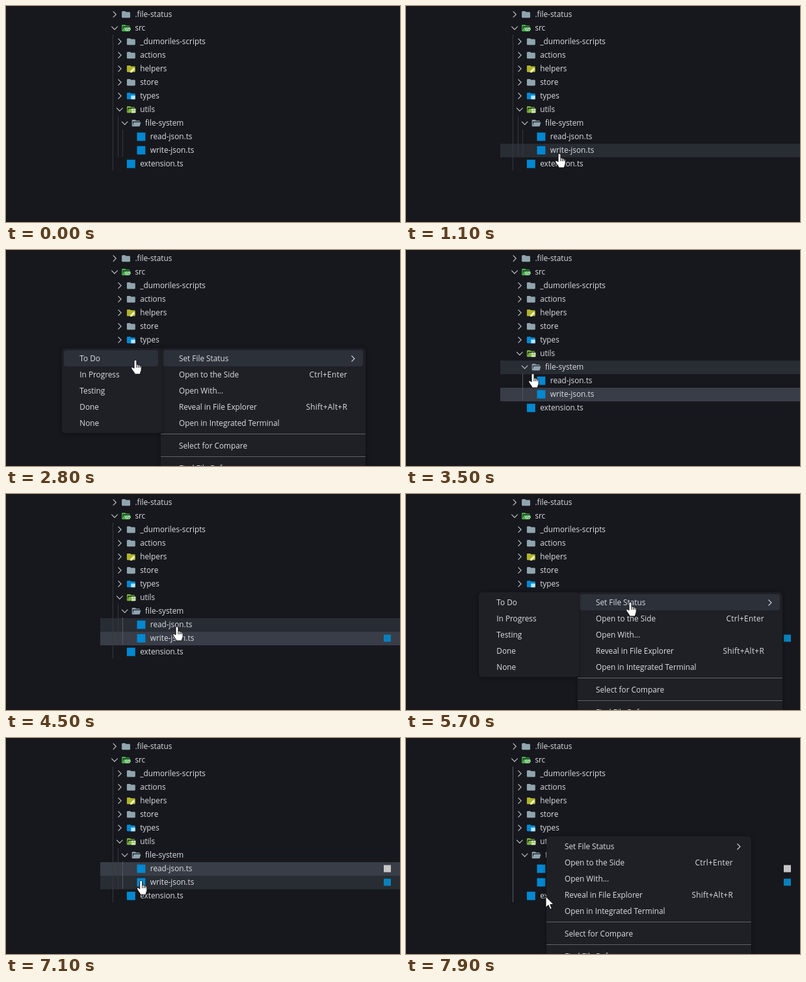
Write an HTML page that moves like this. It is 606x334 px and loops after 8 s.

```html
<!DOCTYPE html>
<html lang="en">
<head>
<meta charset="utf-8">
<title>File status menu</title>
<style>
html, body { margin: 0; width: 100%; height: 100%; overflow: hidden; background: #17181e; }
svg { display: block; width: 606px; height: 334px; }
text { font: 11.8px "Open Sans", "Noto Sans", sans-serif; fill: #dcdfe4; white-space: pre; }
.keys { text-anchor: end; letter-spacing: .3px; }
.panel { filter: drop-shadow(0 1px 3px rgba(0, 0, 0, .4)); }
</style>
</head>
<body>
<svg id="stage" viewBox="0 0 606 334"></svg>
<script>
const LOOP = 8000, STEP = 100;
const HOVER = '#282c33', SELECTED = '#383d47', ITEM = '#2c3039', PANEL = '#1f2026';
const stage = document.getElementById('stage');

function add(parent, tag, attrs = {}, text) {
  const el = document.createElementNS('http://www.w3.org/2000/svg', tag);
  for (const key in attrs) el.setAttribute(key, attrs[key]);
  if (text) el.textContent = text;
  parent.append(el);
  return el;
}
const rect = (parent, x, y, width, height, fill, rx = 0) =>
  add(parent, 'rect', { x, y, width, height, fill, rx });
const show = (el, on) => el.setAttribute('visibility', on ? 'visible' : 'hidden');
const move = (el, x, y) => el.setAttribute('transform', `translate(${x} ${y})`);

// File tree
const CLOSED = 'M10 4H4a2 2 0 0 0-2 2v12a2 2 0 0 0 2 2h16a2 2 0 0 0 2-2V8a2 2 0 0 0-2-2h-8z';
const OPEN = 'M19 20H4a2 2 0 0 1-2-2V6a2 2 0 0 1 2-2h6l2 2h7a2 2 0 0 1 2 2H4v10l2.14-8h17.07l-2.28 8.5A2 2 0 0 1 19 20z';
const GREY = '#90a4ae', BLUE = '#0288d1';

const rows = [
  { name: '.file-status', depth: 0, color: GREY },
  { name: 'src', depth: 0, color: '#4caf50', open: true, badge: 'code' },
  { name: '_dumoriles-scripts', depth: 1, color: GREY },
  { name: 'actions', depth: 1, color: GREY },
  { name: 'helpers', depth: 1, color: '#afb42b', badge: 'pen' },
  { name: 'store', depth: 1, color: GREY },
  { name: 'types', depth: 1, color: BLUE, badge: 'block' },
  { name: 'utils', depth: 1, color: '#7cb342', open: true, badge: 'tools' },
  { name: 'file-system', depth: 2, color: GREY, open: true },
  { name: 'read-json.ts', depth: 3, file: true },
  { name: 'write-json.ts', depth: 3, file: true },
  { name: 'extension.ts', depth: 1, file: true }
];

const badges = {
  code: icon => add(icon, 'path', { d: 'M14 11l-3.5 4 3.5 4M19 11l3.5 4-3.5 4M17.5 11l-2 8', fill: 'none', stroke: '#c8e6c9', 'stroke-width': 1.8 }),
  pen: icon => add(icon, 'path', { d: 'M10 21v-3.5l8-8 3.5 3.5-8 8z', fill: '#f0f4c3' }),
  block: icon => rect(icon, 12, 11, 10, 9, '#b3e5fc'),
  tools: icon => {
    rect(icon, 13, 10, 10, 10, '#dcedc8', 1);
    add(icon, 'path', { d: 'M13 15h10M18 10v5', stroke: '#7cb342', 'stroke-width': 1.5 });
  }
};

const selectBar = rect(stage, 145, 0, 461, 21, SELECTED);
const hoverBar = rect(stage, 145, 0, 461, 21, HOVER);

rows.forEach((row, i) => {
  const y = 13 + 21 * i, x = 198 + 7.8 * row.depth;
  add(stage, 'text', { x: x + .4, y: y + 4.2 }, row.name);
  const icon = add(stage, 'g', { transform: `translate(${x - 21.2} ${y - 7.6}) scale(.645)` });
  if (row.file) {
    rect(icon, 2, 2, 20, 20, BLUE);
    return;
  }
  add(icon, 'path', { d: row.open ? OPEN : CLOSED, fill: row.color });
  if (row.badge) badges[row.badge](icon);
  add(stage, 'path', {
    d: row.open ? 'M-4.7-2.3L0 2.4 4.7-2.3' : 'M-2.3-4.7L2.4 0-2.3 4.7',
    transform: `translate(${x - 31} ${y})`, fill: 'none', stroke: '#c5c7cb', 'stroke-width': 1.1
  });
});

const guides = [[164, 44, 210], [172, 170, 63], [179, 191, 42]]
  .map(([x, y, h]) => rect(stage, x, y, 1, h, '#36383e'));
const blueMark = rect(stage, 581, 217.5, 11, 11, '#0a80bb');
const whiteMark = rect(stage, 581, 196.5, 11, 11, '#c6c6c6');

// Context menu, drawn from its own left edge
const SUB = -152;
const menu = add(stage, 'g');
const itemY = i => 168 + 25 * i;
const highlight = (parent, x, width) => rect(parent, x, 155, width, 25, ITEM, 4);
const label = (parent, x, y, text) => add(parent, 'text', { x, y: y + 4.2 }, text);

rect(menu, 0, 152, 315, 200, PANEL, 5).setAttribute('class', 'panel');
const menuBar = highlight(menu, 3, 308);
['Set File Status', 'Open to the Side', 'Open With...', 'Reveal in File Explorer', 'Open in Integrated Terminal']
  .forEach((text, i) => label(menu, 28, itemY(i), text));
[['Ctrl+Enter', 1], ['Shift+Alt+R', 3]].forEach(([text, i]) =>
  label(menu, 287, itemY(i), text).setAttribute('class', 'keys'));
add(menu, 'path', { d: 'M293.5 163.5l4.5 4.5-4.5 4.5', fill: 'none', stroke: '#d3d6dc', 'stroke-width': 1.1 });
label(menu, 28, 303, 'Select for Compare');
label(menu, 28, 338, 'Find File References');
[284, 319].forEach(y => rect(menu, 0, y, 315, 1, '#606165'));

const submenu = add(menu, 'g');
rect(submenu, SUB, 152, 154, 131, PANEL, 5).setAttribute('class', 'panel');
const subBar = highlight(submenu, SUB + 3, 145);
['To Do', 'In Progress', 'Testing', 'Done', 'None']
  .forEach((text, i) => label(submenu, SUB + 27.3, itemY(i), text));

// Pointer
const outline = { fill: '#fff', stroke: '#0b0b0e', 'stroke-width': 1, 'stroke-linejoin': 'round' };
const hand = add(stage, 'path', { ...outline,
  d: 'M-3 2C-3-.5 1-.5 1 2V7.5C1.6 6.5 3.5 6.8 3.7 8.2 4.3 7.4 5.9 7.8 6.1 9.2 6.9 8.6 8.2 9.2 8.2 10.6V15C8.2 17.5 6.5 18.5 6.5 22H-2C-2 19.5-7 15-7.3 12.5-7.4 11-5.2 10.3-3 13ZM1 7.5V12M3.7 8.2V12M6.1 9.2V12' });
const arrow = add(stage, 'path', { ...outline,
  d: 'M0 0V17L4 13.4 6.7 19.8 9.3 18.6 6.7 12.5H12.1Z' });

// Timeline
const path = [
  [800, 262, 309], [1100, 237, 228], [1800, 237, 227], [2300, 300, 169], [2700, 300, 169],
  [2800, 200, 170], [2900, 200, 170], [3200, 196, 191], [3700, 196, 191], [4500, 264, 205],
  [5000, 264, 205], [5600, 346, 167], [5800, 346, 167], [6400, 195, 167], [6600, 195, 167],
  [7400, 215, 245], [8000, 215, 245]
];
const menus = [
  { from: 1500, to: 3300, left: 238, sub: 2500 },
  { from: 5000, to: 6600, left: 264, sub: 5500 },
  { from: 7800, to: 8000, left: 216, sub: Infinity }
];
const arrowTimes = [[1300, 1900], [4800, 5200], [7700, 8000]];
const guideFade = [[0, 1], [1500, 1], [1700, 0], [3500, 0], [3800, 1], [4900, 1], [5200, 0], [6600, 0], [6900, 1], [7700, 1], [7900, 0], [8000, 0]];

const within = (t, from, to) => t >= from && t < to;
const smooth = k => k * k * (3 - 2 * k);

function sample(keys, t, col, ease = k => k) {
  let i = 0;
  while (i < keys.length - 2 && t >= keys[i + 1][0]) i++;
  const a = keys[i], b = keys[i + 1];
  const k = Math.min(1, Math.max(0, (t - a[0]) / (b[0] - a[0])));
  return a[col] + (b[col] - a[col]) * ease(k);
}

function placeRow(bar, row, on) {
  show(bar, on && row >= 0 && row < rows.length);
  bar.setAttribute('y', 3 + 21 * row);
}

function placeItem(bar, y, on) {
  const i = Math.floor((y - 155.5) / 25);
  const visible = on && i >= 0 && i < 5;
  show(bar, visible);
  if (visible) bar.setAttribute('y', itemY(i) - 13);
}

function drawTree(t, y, hasMenu) {
  const hovered = Math.round((y - 13) / 21);
  const selected = t < 3300 ? -1 : t < 6600 ? 10 : 9;
  placeRow(selectBar, selected, !hasMenu);
  placeRow(hoverBar, hovered, t >= 800 && !hasMenu && hovered !== selected);

  const active = t < 1500 ? -1 : t < 7700 ? 2 : 0;
  const fade = sample(guideFade, t, 1);
  guides.forEach((guide, i) => {
    guide.setAttribute('fill', i === active ? '#56585e' : '#36383e');
    guide.setAttribute('opacity', i === active ? 1 : fade);
  });
  show(blueMark, t >= 3600);
  show(whiteMark, t >= 7000);
}

function drawMenu(x, y, open, state) {
  menu.setAttribute('display', state ? 'inline' : 'none');
  if (!state) return;
  const inMenu = x > state.left + 1, inSub = open && !inMenu;
  move(menu, state.left, 0);
  submenu.setAttribute('display', open ? 'inline' : 'none');
  placeItem(menuBar, inSub ? itemY(0) : y, inMenu || inSub);
  // The bar inherits visibility rules only while the submenu is shown
  placeItem(subBar, y, inSub);
}

function draw(t) {
  const x = sample(path, t, 1, smooth), y = sample(path, t, 2, smooth);
  const state = menus.find(m => within(t, m.from, m.to));
  drawTree(t, y, !!state);
  drawMenu(x, y, !!state && t >= state.sub, state);
  const pointing = arrowTimes.some(([from, to]) => within(t, from, to));
  show(arrow, pointing);
  show(hand, t >= 800 && !pointing);
  move(arrow, x, y);
  move(hand, x, y);
}

const start = performance.now();
function tick() {
  const t = (performance.now() - start) % LOOP;
  draw(Math.floor(t / STEP) * STEP);
  requestAnimationFrame(tick);
}
tick();
</script>
</body>
</html>
```
